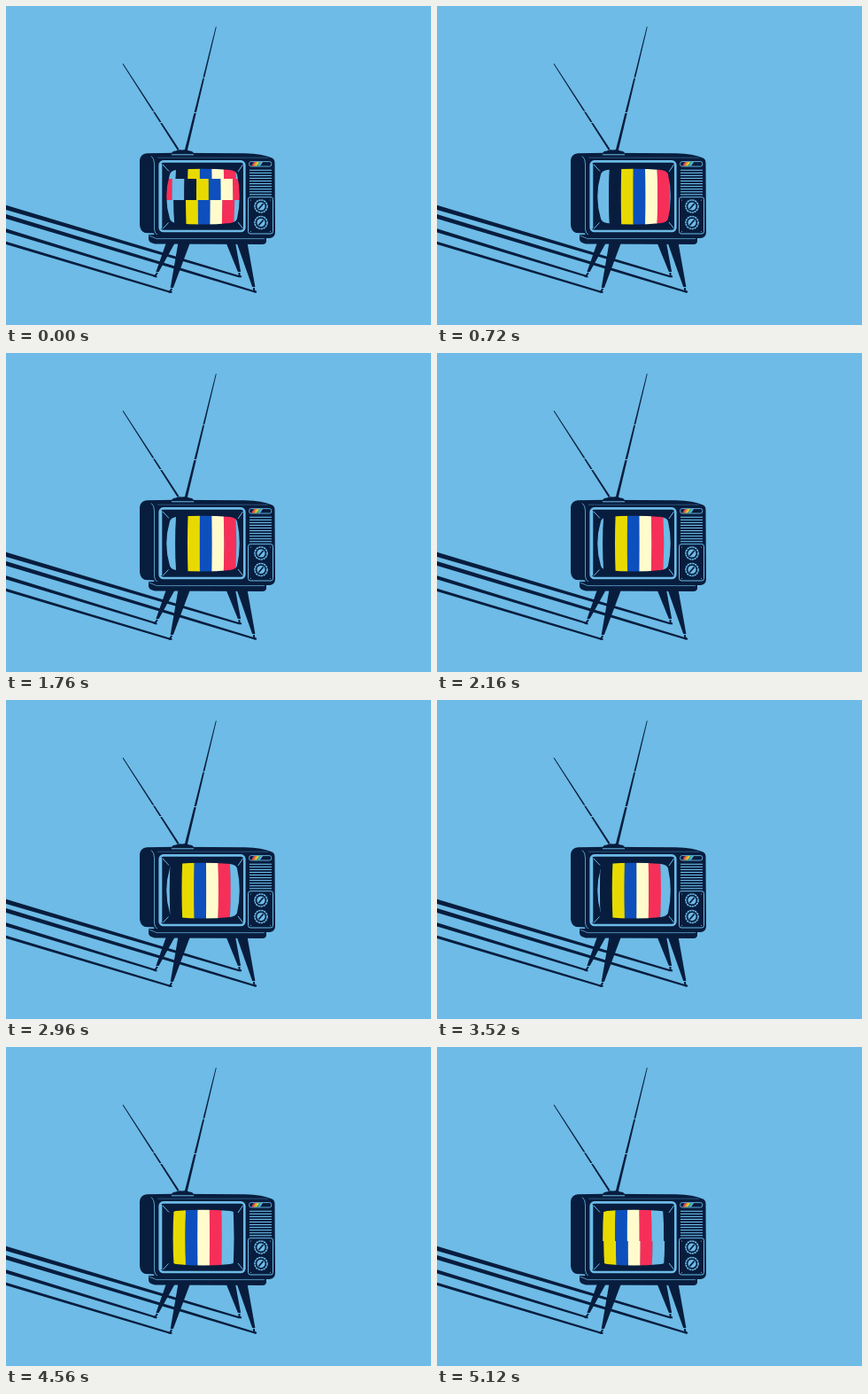
An HTML page with a canvas for the animation above (5.2 s loop, 480 px wide and 360 px high).

```html
<!DOCTYPE html>
<html lang="en">
<head>
<meta charset="utf-8">
<title>Television</title>
<style>
  html, body { margin: 0; width: 100%; height: 100%; overflow: hidden; background: #6dbbe6; }
  canvas { display: block; width: 100vw; height: 100vh; }
</style>
</head>
<body>
<canvas id="stage" width="480" height="360"></canvas>
<script>
const ctx = document.getElementById('stage').getContext('2d');
const SKY = '#6dbbe6', NAVY = '#081d3e';
const BARS = ['#e8da00', '#0d4fbd', '#fffbcd', '#f62f59', SKY, '#081d3e'];
const LOOP = 5200, STEP = 80, BAR = 13.8, CENTRE = 222.5;
const SCREEN = new Path2D('M185 190Q186 186 192 185Q222 182.5 253 185Q260 186 261 190' +
  'Q266.5 215 261 240Q260 244 253 245Q222 248 192 245Q186 244 185 240Q177.5 215 185 190Z');

// Time and left edge of the yellow bar.
const DRIFT = [[0, 205], [640, 208], [1760, 205], [2160, 201], [2960, 198.5],
  [4080, 197], [4400, 196], [4401, 189], [5200, 187]];

function drift(t) {
  const i = DRIFT.findIndex(k => k[0] > t);
  const [t0, a] = DRIFT[i - 1], [t1, b] = DRIFT[i];
  return a + (b - a) * (t - t0) / (t1 - t0);
}

// Horizontal bands of the picture: bottom edge and bar position.
function bands(t) {
  const x = drift(t);
  if (t < 480) {
    const calm = 1 - t / 480, rise = t / 480 * 28;
    return [[195 - rise, x], [219 - rise, x + 10 * calm], [250, x - 2 * calm]];
  }
  if (t >= 4000 && t < 4400) return [[228 - (t - 4080) * .14, x], [250, x - 8]];
  if (t >= 5040) return [[219, x], [250, x + 1]];
  return [[250, x]];
}

function fill(path, color = NAVY) {
  ctx.fillStyle = color;
  ctx.fill(path instanceof Path2D ? path : new Path2D(path));
}

function line(path, width = 1, color = SKY) {
  ctx.strokeStyle = color;
  ctx.lineWidth = width;
  ctx.stroke(new Path2D(path));
}

function box(x, y, w, h, r, color, width) {
  ctx.beginPath();
  ctx.roundRect(x, y, w, h, r);
  ctx.fillStyle = ctx.strokeStyle = color;
  ctx.lineWidth = width;
  width ? ctx.stroke() : ctx.fill();
}

function taper(x0, y0, w0, x1, y1, w1) {
  const len = Math.hypot(x1 - x0, y1 - y0);
  const nx = (y0 - y1) / len / 2, ny = (x1 - x0) / len / 2;
  fill(`M${x0 + nx * w0} ${y0 + ny * w0}L${x1 + nx * w1} ${y1 + ny * w1}` +
    `L${x1 - nx * w1} ${y1 - ny * w1}L${x0 - nx * w0} ${y0 - ny * w0}Z`);
}

function antenna(x0, y0, x1, y1, width, gaps) {
  taper(x0, y0, .9, x1, y1, width);
  for (const y of gaps) {
    const x = x0 + (x1 - x0) * (y - y0) / (y1 - y0);
    line(`M${x - 3} ${y}L${x + 3} ${y}`, 1);
  }
}

function knob(x, y) {
  ctx.beginPath();
  ctx.arc(x, y, 7, 0, 7);
  ctx.strokeStyle = SKY;
  ctx.lineWidth = 1.6;
  ctx.setLineDash([2.4, .6]);
  ctx.stroke();
  ctx.setLineDash([]);
  ctx.beginPath();
  ctx.arc(x, y, 4.6, 0, 7);
  ctx.fillStyle = SKY;
  ctx.fill();
  line(`M${x - 2.6} ${y + 3}L${x + 2.6} ${y - 3}`, 1.8, NAVY);
}

function drawShadow() {
  taper(-2, 226.7, 5, 264, 305.5, 2);
  taper(-2, 237, 4.8, 282, 322.7, 2);
  taper(-2, 252.7, 4, 169, 305, 2);
  taper(-2, 266.8, 3, 186, 323, 2);
}

function drawAntennas() {
  antenna(132, 65.3, 194.5, 162, 2.2, [119, 131.5]);
  antenna(237.3, 23.5, 203.3, 163, 3, [81, 120.5]);
  fill('M187 167Q187 163.5 192 163.5Q194 161.5 199 162.5Q204 161 207 163.5Q212 163.5 212 167Z');
}

function leg(left, right, ankleX, ankleY, footX, footY) {
  fill(`M${left} 267L${right} 267L${ankleX + 1.6} ${ankleY}L${ankleX - 1.6} ${ankleY}Z`);
  line(`M${ankleX} ${ankleY + 1}L${footX - .5} ${footY - .5}L${footX + 2} ${footY}`, 2, NAVY);
}

function drawLegs() {
  leg(181, 191, 171, 300, 168.5, 305.5);
  leg(194.5, 208, 187.3, 318, 185.5, 323);
  leg(248.5, 259, 263.5, 300, 264, 305.5);
  leg(260.5, 272.5, 279.8, 317, 281, 322.7);
}

function drawBody() {
  fill('M161 258L294 258L294 266Q293 269 290 269L168 268.5Q161 267 161 263Z');
  fill('M151 174Q152 167 159 166.3L190 165.7L270 166.3Q290 167 299 171Q303.5 172 303.5 177' +
    'L304 255Q304 261 298 262L172 262.3Q168 261 167 256.5L157 256Q151.5 254 151 247Z');
  line('M187 167.8L212 167.8', 1);
  line('M164 169.5Q167.5 172 167.5 178L167.5 252Q168 257 171 258', .8);
  line('M171 171.2L296 171.2', .35);
  line('M161.5 259L170 262.6L292 262.6', .7);
  box(173.7, 175.4, 95.6, 78.6, 4, SKY, 2.6);
  line('M174.8 178L174.8 251', 3);
  line('M177 179L184 186.5M267.5 179L262 187M177 251.5L183.5 244.5M267.5 251L262 244', 1);
}

function drawControls() {
  box(274.7, 175.6, 25, 5.4, 2, SKY, .9);
  ['#ef3f55', '#f2a12b', '#f0df38', '#46b98a', '#65b9e4'].forEach((color, i) => {
    const x = 277 + i * 2;
    fill(`M${x} 180.5L${x + 3} 176L${x + 5} 176L${x + 2} 180.5Z`, color);
  });
  for (let i = 0; i < 10; i++) {
    const y = 185.3 + i * 3.05;
    line(`M275 ${y}L300 ${y}`, 1.1);
  }
  box(273.5, 215.7, 28, 41.3, 2.5, SKY, 1);
  knob(288, 226);
  knob(288, 244.5);
  for (const x of [276.5, 298.5]) {
    for (const y of [219, 254.5]) box(x - .5, y - .5, 1, 1, .5, SKY);
  }
}

function drawBand(top, bottom, start) {
  ctx.save();
  ctx.beginPath();
  ctx.rect(178, top, 90, bottom - top);
  ctx.clip();
  const edge = x => CENTRE + (x - CENTRE) * .97;
  for (let i = -4; i < 8; i++) {
    const a = start + i * BAR, b = a + BAR + .3;
    const midA = 2 * a - edge(a), midB = 2 * b - edge(b);
    fill(`M${edge(a)} 182Q${midA} 215 ${edge(a)} 248L${edge(b)} 248Q${midB} 215 ${edge(b)} 182Z`,
      BARS[(i + 6) % 6]);
  }
  ctx.restore();
}

function drawScreen(t) {
  ctx.save();
  ctx.clip(SCREEN);
  let top = 182;
  for (const [bottom, x] of bands(t)) {
    if (bottom > top) {
      drawBand(top, bottom, x);
      top = bottom;
    }
  }
  ctx.restore();
}

function frame(now) {
  const t = Math.floor(now % LOOP / STEP) * STEP;
  ctx.fillStyle = SKY;
  ctx.fillRect(0, 0, 480, 360);
  drawShadow();
  drawAntennas();
  drawLegs();
  drawBody();
  drawControls();
  drawScreen(t);
  requestAnimationFrame(frame);
}
frame(0);
</script>
</body>
</html>
```
